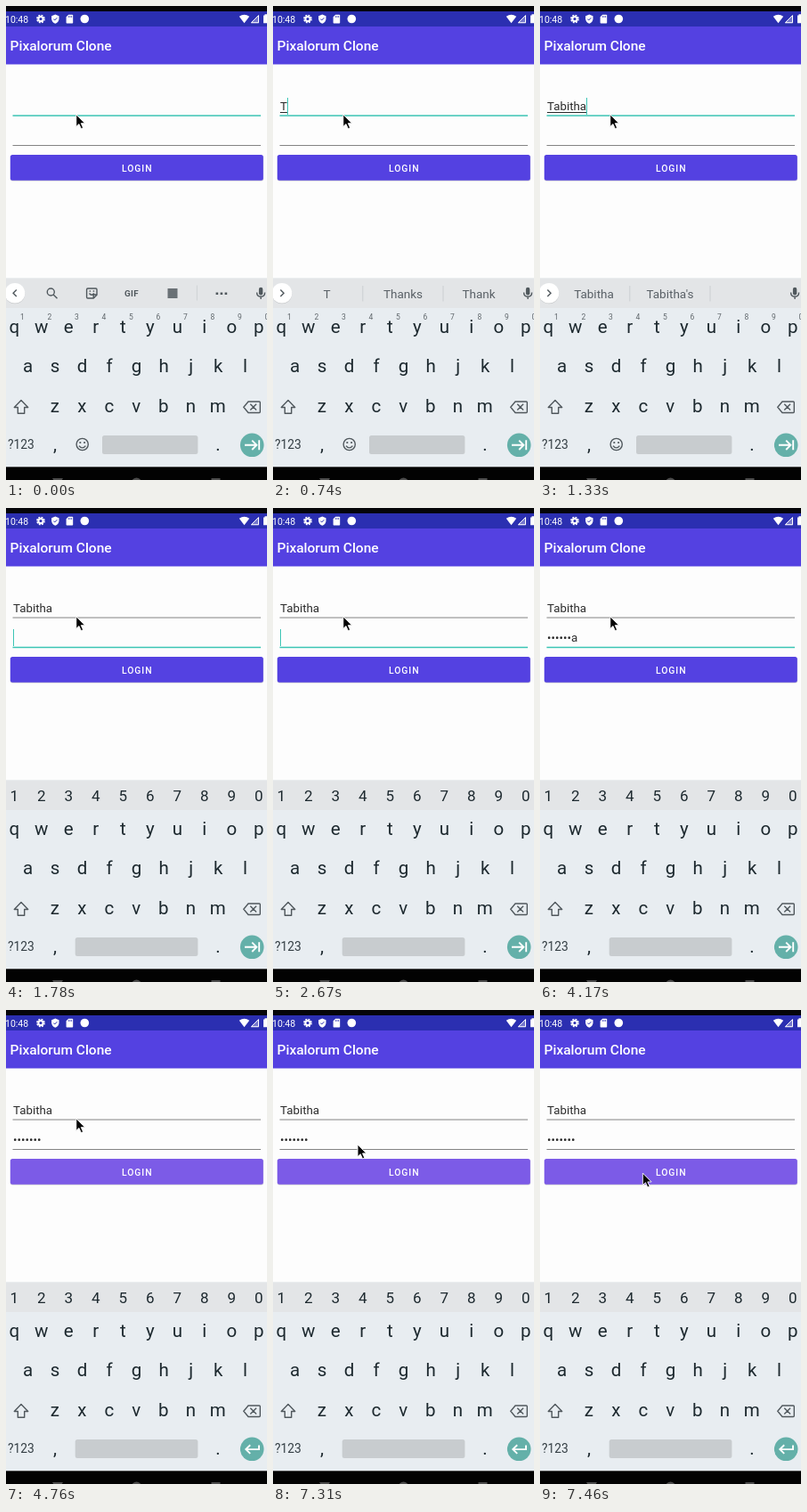
An HTML page for the animation above (8000 ms loop, 293 by 532 pixels).

```html
<!DOCTYPE html>
<html lang="en">
<head>
<meta charset="utf-8">
<title>Login screen</title>
<style>
  html, body { margin: 0; width: 100%; height: 100%; overflow: hidden; background: #fdfdfd; }
  svg { position: absolute; left: 0; top: 0; display: block; }
  svg, .field { font-family: Roboto, sans-serif; }
  .mid { text-anchor: middle; }
  .key { font-size: 20.5px; fill: #1d292f; }
  .digit { font-size: 17px; fill: #1d292f; }
  .hint { font-size: 8.5px; fill: #60676c; }
  .word { font-size: 13.5px; fill: #596066; }
  .line { fill: none; stroke: #50585d; stroke-width: 1.4; }
  .white { fill: none; stroke: #fff; stroke-width: 1.9; }
  .field {
    position: absolute; left: 8px; height: 19px; line-height: 19px;
    font-size: 13.3px; color: #2b2b2b; white-space: pre;
  }
  .field span { vertical-align: top; }
  .composing { text-decoration: underline; text-decoration-thickness: 1px; text-underline-offset: 1.5px; }
  .caret { position: absolute; left: 100%; top: 0; width: 1.4px; height: 18.5px; background: #3cc5b5; }
</style>
</head>
<body>
<svg id="stage" width="293" height="532" viewBox="0 0 293 532">
  <rect width="293" height="532" fill="#fdfdfd"/>

  <!-- status bar -->
  <rect width="293" height="6.5" fill="#050508"/>
  <rect y="6" width="293" height="17.5" fill="#2b2fb1"/>
  <g fill="#fff">
    <text x="-1" y="18.5" font-size="10.5">10:48</text>
    <circle cx="39" cy="14.5" r="2.6" fill="none" stroke="#fff" stroke-width="2"/>
    <circle cx="39" cy="14.5" r="4.1" fill="none" stroke="#fff" stroke-width="1.5" stroke-dasharray="2 1.22"/>
    <path d="M55.3 9.5l4.2 1.8v3c0 2.6-1.8 4.7-4.2 5.4-2.4-.7-4.2-2.8-4.2-5.4v-3z"/>
    <path d="M53.3 14.6l1.4 1.4 2.6-2.8" fill="none" stroke="#2b2fb1"/>
    <path d="M70.2 9.7h4.2q.8 0 .8.8v8.2q0 .8-.8.8h-6q-.8 0-.8-.8v-6.4z"/>
    <path d="M70.3 11v2M72 11v2M73.6 11v2" stroke="#2b2fb1" stroke-width=".7"/>
    <circle cx="88.3" cy="14.5" r="4.8"/>
    <path d="M261.8 11.8q5.7-4.2 11.4 0l-5.7 7.4z"/>
    <path d="M284 10v9.2h-9.2z" fill-opacity=".35"/>
    <path d="M283.5 10.6v8.1h-8.1z" fill="none" stroke="#fff"/>
    <path d="M289 10.5h1.5v-1.2h4v10H289z"/>
  </g>

  <!-- app bar -->
  <rect y="23" width="293" height="42.5" fill="#5441e1"/>
  <text x="4.5" y="50.2" font-size="15.5" font-weight="500" fill="#fff">Pixalorum Clone</text>

  <!-- form -->
  <rect id="line1" x="7.5" width="278.5"/>
  <rect id="line2" x="7.5" width="278.5"/>
  <rect x="5" y="167.8" width="284" height="28.8" rx="2.5" fill="#000" opacity=".18"/>
  <rect id="button" x="4.8" y="167" width="284" height="28.7" rx="2.5"/>
  <text x="147.3" y="185.6" class="mid" font-size="10.4" font-weight="500" letter-spacing=".93" fill="#fff">LOGIN</text>

  <!-- keyboard -->
  <rect y="305.5" width="293" height="212" fill="#e8edf1"/>
  <rect y="305.5" width="293" height="33.5" fill="#e3e5e7"/>
  <g id="keys"></g>
  <g id="hints"></g>
  <g id="digits"></g>

  <g id="strip">
    <circle cx="10" cy="323" r="11.3" fill="#000" opacity=".12"/>
    <circle cx="10" cy="322.3" r="11.3" fill="#fff"/>
    <path id="chevron" class="line"/>
    <rect x="283.9" y="315.8" width="4.4" height="8.6" rx="2.2" fill="#50585d"/>
    <path class="line" d="M281.6 321.5q0 4.7 4.5 4.7t4.5-4.7M286.1 326v3"/>
  </g>

  <g id="tools">
    <circle class="line" cx="50.3" cy="321" r="4"/>
    <path class="line" d="M53.2 324l4.3 4.3" stroke-width="1.8"/>
    <path class="line" d="M91.8 317h9q1.2 0 1.2 1.2v6l-3.8 3.8h-6.4q-1.2 0-1.2-1.2v-8.6q0-1.2 1.2-1.2zM102 324h-3.8v4M93.5 322.5q2.6 3.4 5.4 0"/>
    <path d="M93.6 319.2h1.5v1.5h-1.5zM97.7 319.2h1.5v1.5h-1.5z" fill="#50585d"/>
    <text x="141" y="326" class="mid" font-size="9.8" font-weight="700" letter-spacing=".3" fill="#50585d">GIF</text>
    <rect x="181.5" y="317" width="11" height="11" fill="#6a7176"/>
    <path d="M214.4 313.5v17" stroke="#cfd3d5"/>
    <path d="M235.6 321.4h2.6v2.6h-2.6zM240.6 321.4h2.6v2.6h-2.6zM245.6 321.4h2.6v2.6h-2.6z" fill="#50585d"/>
  </g>

  <g id="words">
    <path d="M100.8 314v17.5M191 314v17.5" stroke="#cbcfd2"/>
  </g>

  <path class="line" d="M17 442.5l7.7 8h-4v6.7h-7.4v-6.7h-4z" stroke-linejoin="round"/>
  <path class="line" d="M272 444h12.3q1 0 1 1v10.5q0 1-1 1H272l-5.2-6.2zM274.3 446.8l6.8 6.8M281.1 446.8l-6.8 6.8"/>
  <text x="2" y="497" font-size="13.8" fill="#333d43">?123</text>
  <g id="emoji">
    <circle class="line" cx="85.7" cy="492" r="6.6"/>
    <path class="line" d="M82 493.6q3.7 4.6 7.4 0"/>
    <circle cx="83.3" cy="490" r="1.1" fill="#50585d"/>
    <circle cx="88.1" cy="490" r="1.1" fill="#50585d"/>
  </g>
  <rect id="space" y="482" height="21" rx="2.5" fill="#c8cccf"/>
  <circle cx="276.2" cy="492.8" r="13.3" fill="#64b0a9"/>
  <path id="enter" class="white"/>

  <!-- navigation bar -->
  <rect y="517.3" width="293" height="15" fill="#020202"/>
  <g fill="#4c4c4c">
    <path d="M52 530h12l-3 5h-6z"/>
    <circle cx="146.5" cy="535" r="5.5"/>
    <rect x="230.5" y="530" width="10" height="8"/>
  </g>
</svg>

<div class="field" style="top:103px"><span id="name"></span><i class="caret" id="caret1"></i></div>
<div class="field" style="top:136.3px"><span id="pass"></span><i class="caret" id="caret2"></i></div>

<svg id="cursor" width="12" height="19" viewBox="-1 -1 12 19">
  <path d="M0 0v13.6l3.2-2.9 2.3 5.2 2.3-1-2.3-5h4.3z" fill="#050505" stroke="#fff" stroke-width=".9"/>
</svg>

<script>
const LOOP = 8000;
const $ = id => document.getElementById(id);

function label(parent, text, x, y, cls) {
  const el = document.createElementNS('http://www.w3.org/2000/svg', 'text');
  el.setAttribute('x', x);
  el.setAttribute('y', y);
  el.setAttribute('class', 'mid ' + cls);
  el.textContent = text;
  return $(parent).appendChild(el);
}

function row(parent, chars, x, y, cls) {
  [...chars].forEach((c, i) => label(parent, c, x + i * 30.5, y, cls));
}

row('keys', 'qwertyuiop', 9.3, 367.3, 'key');
row('keys', 'asdfghjkl', 24.6, 411.3, 'key');
row('keys', 'zxcvbnm', 54.8, 456, 'key');
label('keys', ',', 55, 499, 'key');
label('keys', '.', 238, 499, 'key');
row('hints', '1234567890', 18.5, 352, 'hint');
row('digits', '1234567890', 9.3, 329.3, 'digit');
const words = [60.5, 146, 231].map(x => label('words', '', x, 327.7, 'word'));

// Each step changes only the listed properties; the rest carry over.
const steps = [
  { at: 0, name: '', pass: '', focus: 1, caret: false, mode: 'tools', words: [],
    pressed: false, enter: 'next', x: 78.8, y: 121.8 },
  { at: 290, caret: true },
  { at: 740, name: 'T', mode: 'words', words: ['T', 'Thanks', 'Thank'] },
  { at: 880, name: 'Ta', words: ['Ta', 'Take', 'Talk'] },
  { at: 1030, name: 'Tabi', words: ['Tabi', 'Tabs', 'Table'] },
  { at: 1180, name: 'Tabit', words: ['Tabit', 'Tabitha', "Tabitha's"] },
  { at: 1330, name: 'Tabitha', words: ['Tabitha', "Tabitha's", ''] },
  { at: 1780, focus: 2, mode: 'digits' },
  { at: 2230, caret: false },
  { at: 2670, caret: true },
  { at: 2970, pass: 'T' },
  { at: 3120, pass: '•a' },
  { at: 3270, pass: '••r' },
  { at: 3420, pass: '•••i' },
  { at: 3570, pass: '••••e' },
  { at: 3720, pass: '••••••a' },
  { at: 4170, caret: false },
  { at: 4610, pass: '•••••••', focus: 0, pressed: true },
  { at: 4760, enter: 'done' },
  { at: 7310, x: 95, y: 151 },
  { at: 7460, x: 115.3, y: 183 }
];

const enterIcons = {
  next: 'M268 492.8h13M276.2 487.6l5.2 5.2-5.2 5.2M284.2 487.3v11',
  done: 'M284 488.5v4.6h-14M274.2 488.3l-4.9 4.8 4.9 4.8'
};

const show = (id, on) => { $(id).style.display = on ? '' : 'none'; };
const set = (id, attr, value) => $(id).setAttribute(attr, value);

function underline(id, y, focused) {
  set(id, 'y', focused ? y - 0.3 : y);
  set(id, 'height', focused ? 1.5 : 0.9);
  set(id, 'fill', focused ? '#3cc5b5' : '#777');
}

function render(s) {
  $('name').textContent = s.name;
  $('name').className = s.focus === 1 ? 'composing' : '';
  $('pass').textContent = s.pass;
  show('caret1', s.caret && s.focus === 1);
  show('caret2', s.caret && s.focus === 2);
  underline('line1', 122.6, s.focus === 1);
  underline('line2', 156, s.focus === 2);
  set('button', 'fill', s.pressed ? '#7c5be7' : '#5441e1');

  const secret = s.mode === 'digits';
  show('tools', s.mode === 'tools');
  show('words', s.mode === 'words');
  show('digits', secret);
  for (const id of ['strip', 'hints', 'emoji']) show(id, !secret);
  words.forEach((el, i) => { el.textContent = s.words[i] || ''; });
  set('chevron', 'd', s.mode === 'tools' ? 'M11.8 318.6l-3.7 3.7 3.7 3.7' : 'M8.4 318.6l3.7 3.7-3.7 3.7');
  set('space', 'x', secret ? 77.7 : 108);
  set('space', 'width', secret ? 137.7 : 107.4);
  set('enter', 'd', enterIcons[s.enter]);
  $('cursor').style.transform = `translate(${s.x - 1}px, ${s.y - 1}px)`;
}

let shown = -1;
function tick() {
  const t = performance.now() % LOOP;
  const count = steps.filter(s => s.at <= t).length;
  if (count !== shown) {
    shown = count;
    render(Object.assign({}, ...steps.slice(0, count)));
  }
  requestAnimationFrame(tick);
}
tick();
</script>
</body>
</html>
```
